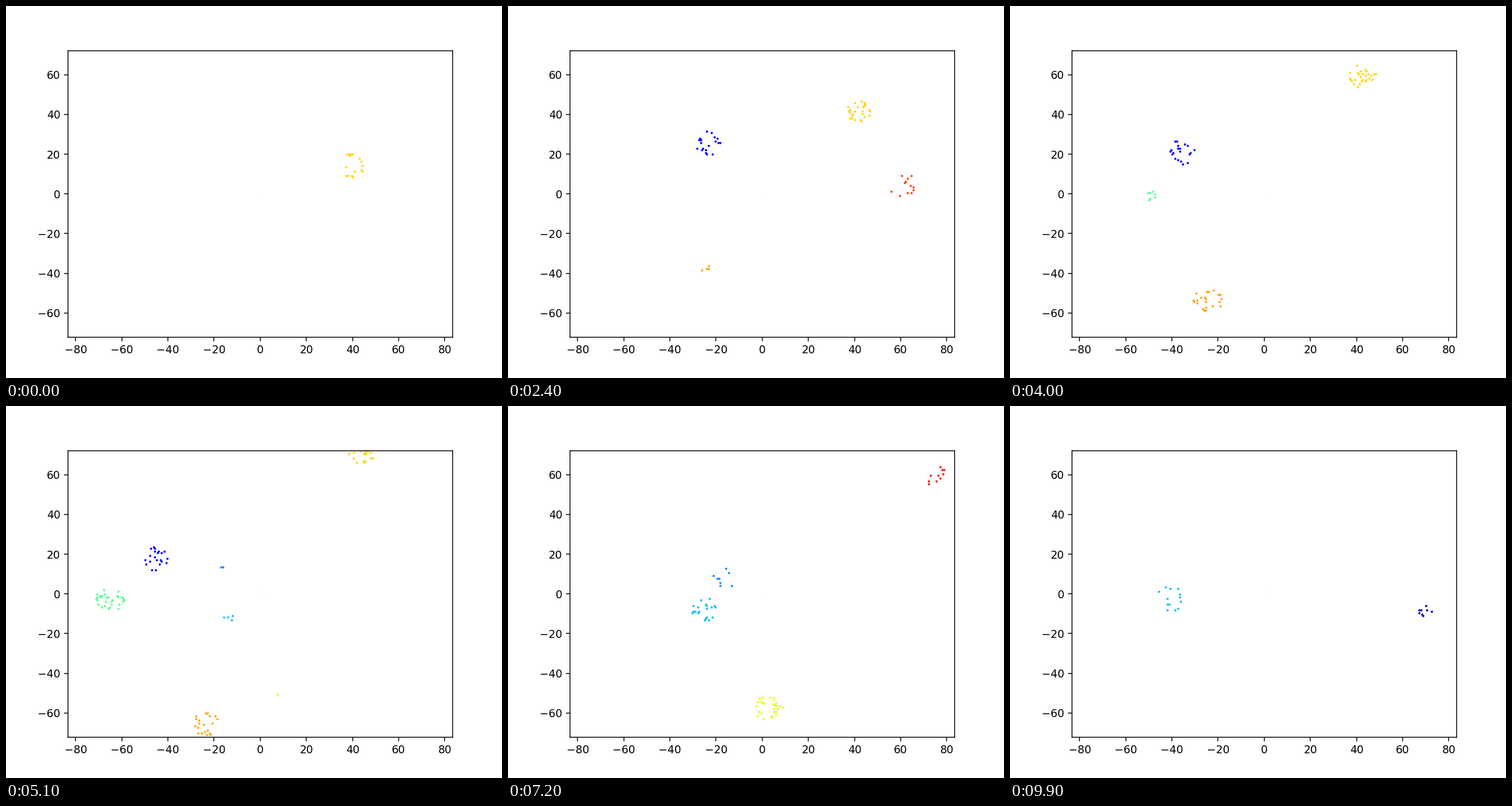
A matplotlib script that plays this animation: 864 px wide and 648 px high, repeating every 10000 ms.

```python
import numpy as np
import matplotlib.pyplot as plt
from matplotlib.animation import FuncAnimation

FRAMES, STEP = 100, 100          # frame count, ms per frame
SPACING = 5 / 6                  # hexagonal lattice of cells
ROW = SPACING * np.sqrt(3) / 2
HALF = 100
RADIUS = 6.3

rng = np.random.default_rng(7)

# Rows alternate by half a cell, centred on the origin.
j, i = np.mgrid[-HALF:HALF, -HALF:HALF]
cells = np.column_stack([
    ((i + np.where(j % 2, 0.25, 0.75)) * SPACING).ravel(),
    ((j + 0.5) * ROW).ravel(),
])


class Wave:
    """A patch of flickering cells drifting at constant velocity."""

    def __init__(self, color, t0, pos, vel, counts):
        self.color = np.array(color) / 255
        self.t0 = t0
        self.pos, self.vel = np.array(pos), np.array(vel)
        self.times, self.counts = zip(*counts)

    def active(self, t):
        n = np.interp(t, self.times, self.counts, left=0, right=0)
        center = self.pos + self.vel * (t - self.t0)
        r = min(RADIUS, 2.3 + 3 * (t - self.times[0]))
        if n < 0.5 or r <= 0:
            return cells[:0]
        near = cells[np.hypot(*(cells - center).T) <= r]
        # Part of the patch may lie beyond the lattice.
        share = len(near) * SPACING * ROW / (np.pi * r * r)
        n = min(len(near), int(round(n * min(1, share + 0.02))))
        return near[rng.permutation(len(near))[:n]]


waves = [
    Wave((255, 214, 0), 0, (39.3, 14.5), (0.9, 11.2),
         [(-1.4, 2), (0, 16), (2.4, 25), (5.1, 28), (5.4, 12), (5.5, 0)]),
    Wave((255, 64, 0), 2.4, (61.8, 3.5), (0.6, 17),
         [(0.1, 0), (0.2, 4), (1, 22), (2.4, 12), (2.9, 0)]),
    Wave((0, 0, 255), 2.4, (-23, 25.7), (-8.2, -3.1),
         [(0.5, 0), (1.4, 18), (5.1, 21), (6.3, 6), (6.9, 0)]),
    Wave((255, 163, 0), 4, (-24.4, -54), (0.6, -11),
         [(2.1, 0), (2.4, 4), (4, 22), (5.1, 20), (6, 0)]),
    Wave((88, 255, 145), 4, (-47.7, -1.3), (-15.7, -1.2),
         [(3.7, 0), (4, 7), (5.1, 29), (5.6, 26), (6.3, 5), (6.6, 0)]),
    Wave((0, 140, 255), 6.3, (-17.2, 10), (0.5, -2.5),
         [(5, 0), (5.1, 2), (6.3, 27), (7.6, 0)]),
    Wave((0, 190, 255), 8.2, (-31.2, -5.8), (-5.7, 1.9),
         [(4.9, 0), (5.1, 4), (6.3, 8), (8.2, 34), (9.9, 13)]),
    Wave((232, 255, 0), 6.3, (4.5, -55.4), (-2, -2.3),
         [(5, 0), (5.1, 1), (6.3, 42), (7.7, 18), (8.2, 1)]),
    Wave((255, 16, 0), 8.2, (78.5, 65), (4, 5.2),
         [(6.2, 0), (6.3, 1), (8.2, 20), (9.3, 0)]),
    Wave((0, 0, 190), 9.9, (70, -8.6), (0, -3),
         [(9.6, 0), (9.9, 8)]),
]


def snapshot(t):
    patches = [wave.active(t) for wave in waves]
    colors = [np.tile(w.color, (len(p), 1)) for w, p in zip(waves, patches)]
    return np.vstack(patches), np.vstack(colors)


shots = [snapshot(frame * STEP / 1000) for frame in range(FRAMES)]

fig, ax = plt.subplots(figsize=(6.4, 4.8), dpi=135)
ax.set_xlim(-HALF * SPACING, HALF * SPACING)
ax.set_ylim(-HALF * ROW, HALF * ROW)

dots = ax.scatter([], [], s=4.2, linewidths=0)
speck = ax.scatter([0], [0], s=0.35, color="0.75", linewidths=0)


def update(frame):
    points, colors = shots[frame]
    dots.set_offsets(points)
    dots.set_facecolor(colors)
    speck.set_offsets([[frame % 2, frame % 2]])
    return dots, speck


anim = FuncAnimation(fig, update, frames=FRAMES, interval=STEP,
                     repeat=True, repeat_delay=0)
plt.show()
```
